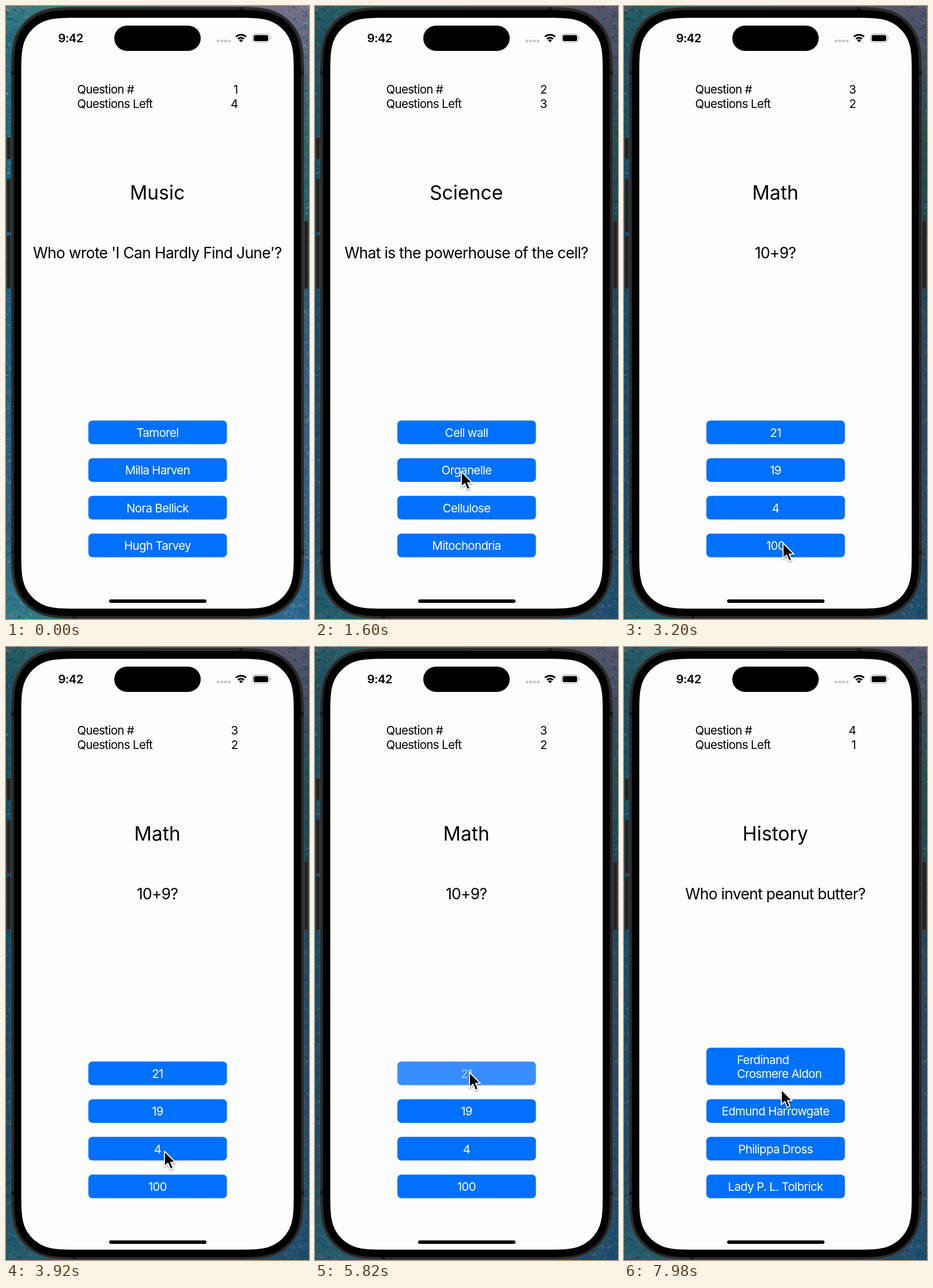
Recreate the animation shown at these times as an HTML page. Size 526 px wide and 1064 px high, loop 8000 ms.

```html
<!DOCTYPE html>
<html lang="en">
<head>
<meta charset="utf-8">
<title>Quiz</title>
<style>
html, body { margin: 0; width: 100%; height: 100%; overflow: hidden; background: #185a78; }
svg { display: block; width: 526px; height: 1064px; }
text { font: 400 20.5px Inter, Roboto, sans-serif; letter-spacing: -.033em; fill: #000; }
.mid { text-anchor: middle; }
.end { text-anchor: end; }
.title { font-size: 33.7px; letter-spacing: 0; }
.ask { font-size: 26.5px; letter-spacing: -.027em; }
.clock { font-weight: 600; }
.answer { fill: #fff; }
</style>
</head>
<body>
<svg viewBox="0 0 526 1064">
  <defs>
    <linearGradient id="left" x2="0" y2="1">
      <stop offset="0" stop-color="#3a7c80"/><stop offset=".05" stop-color="#256a7c"/>
      <stop offset=".3" stop-color="#10658a"/><stop offset=".6" stop-color="#1b6288"/>
      <stop offset=".85" stop-color="#2a6189"/><stop offset="1" stop-color="#2d7c87"/>
    </linearGradient>
    <linearGradient id="right" x2="0" y2="1">
      <stop offset="0" stop-color="#77708a"/><stop offset=".08" stop-color="#5c6680"/>
      <stop offset=".2" stop-color="#2a6668"/><stop offset=".35" stop-color="#235e70"/>
      <stop offset=".6" stop-color="#365f86"/><stop offset="1" stop-color="#28658f"/>
    </linearGradient>
    <filter id="soft" x="-50%" y="-50%" width="200%" height="200%">
      <feDropShadow dx="0" dy="2" stdDeviation="1.5" flood-opacity=".4"/>
    </filter>
  </defs>

  <rect width="263" height="1064" fill="url(#left)"/>
  <rect x="263" width="263" height="1064" fill="url(#right)"/>
  <g id="paint" fill="none" stroke-linecap="round"></g>
  <rect id="shade" width="526" height="1064" fill="#00101a" opacity="0"/>

  <!-- phone body -->
  <g fill="#222" stroke="#454545" stroke-width=".8">
    <rect x="1.5" y="228" width="9" height="38" rx="2"/>
    <rect x="1.5" y="300" width="9" height="93" rx="2"/>
    <rect x="1.5" y="398" width="9" height="93" rx="2"/>
    <rect x="515" y="373" width="9.5" height="118" rx="2"/>
  </g>
  <path id="body" fill="#292929" stroke="#505050"/>
  <path d="M9 116h6M511 116h6M9 948h6M511 948h6M408 2v6M119 1057v6" stroke="#151515" stroke-width="6"/>
  <path id="bezel"/>
  <path id="screen" fill="#fdfdfd"/>

  <!-- status bar -->
  <text class="clock" x="90.5" y="63">9:42</text>
  <rect x="188" y="34" width="150" height="44" rx="22"/>
  <g fill="#c6c6c8">
    <rect x="365.5" y="58.5" width="5" height="4.5" rx="1.5"/>
    <rect x="372" y="58.5" width="5" height="4.5" rx="1.5"/>
    <rect x="378.5" y="58.5" width="5" height="4.5" rx="1.5"/>
    <rect x="385" y="58.5" width="5" height="4.5" rx="1.5"/>
  </g>
  <path d="M399.2 53.5A12.5 12.5 0 0 1 416.8 53.5M402.7 57.2A7.5 7.5 0 0 1 413.3 57.2" fill="none" stroke="#000" stroke-width="3"/>
  <path d="M408 63l-3.4-3.5a4.8 4.8 0 0 1 6.8 0z"/>
  <rect x="428" y="48.5" width="29" height="14.5" rx="4.5" fill="none" stroke="#a4a4a6" stroke-width="1.2"/>
  <rect x="430" y="50.5" width="25" height="10.5" rx="2.8"/>
  <path d="M458.8 53.2q2.6 2.5 0 5z" fill="#a4a4a6"/>

  <text x="123.5" y="152">Question #</text>
  <text x="123.5" y="176.5">Questions Left</text>
  <g id="quiz"></g>
  <rect x="179" y="1030" width="169" height="6" rx="3"/>
  <path id="cursor" d="M0 0V26.5L6.2 21L10.5 31L15 29L10.9 19.4H19Z" stroke="#fff" stroke-width="1.8" stroke-linejoin="round" filter="url(#soft)"/>
</svg>
<script>
const LOOP = 8000;
const $ = id => document.getElementById(id);

const rounds = [
  { at: 0, topic: "Music", ask: "Who wrote 'I Can Hardly Find June'?",
    answers: ["Tamorel", "Milla Harven", "Nora Bellick", "Hugh Tarvey"] },
  { at: 1120, topic: "Science", ask: "What is the powerhouse of the cell?",
    answers: ["Cell wall", "Organelle", "Cellulose", "Mitochondria"] },
  { at: 2720, topic: "Math", ask: "10+9?", answers: ["21", "19", "4", "100"] },
  { at: 5940, topic: "History", ask: "Who invent peanut butter?",
    answers: ["Ferdinand\nCrosmere Aldon", "Edmund Harrowgate", "Philippa Dross", "Lady P. L. Tolbrick"] }
];

// start, end, button index
const presses = [[1000, 1120, 1], [2580, 2720, 3], [5780, 5940, 0]];

// time, x, y of the pointer tip
const path = [
  [350, 262, 1070], [900, 254, 808], [1750, 254, 808], [2400, 276, 932],
  [3200, 276, 932], [3800, 275, 875], [4400, 275, 875], [5000, 270, 790],
  [5200, 270, 790], [5650, 268, 738], [6300, 268, 738], [7300, 273, 768], [LOOP, 273, 768]
];

// rectangle whose corners ease gradually into the straight sides
function smoothRect(x, y, w, h, r) {
  const arc = [[1.529, 0], [1.088, 0], [.868, 0], [.631, .075], [.373, .169],
    [.169, .373], [.075, .631], [0, .868], [0, 1.088], [0, 1.529]];
  const corner = (right, bottom, turn) => {
    const pts = arc.map(([a, b]) => [right ? x + w - a * r : x + a * r, bottom ? y + h - b * r : y + b * r]);
    if (turn) pts.reverse();
    return `${pts[0]} C${pts.slice(1).join(" ")}`;
  };
  return `M${corner(0, 0, true)} L${corner(1, 0)} L${corner(1, 1, true)} L${corner(0, 1)}Z`;
}

function button(label, i, pressed) {
  const lines = label.split("\n"), extra = (lines.length - 1) * 24;
  const y = 719.5 + i * 65.4, base = y + 28.2;
  const text = extra
    ? lines.map((s, k) => `<text class="answer" x="196" y="${base - extra + k * 24}">${s}</text>`).join("")
    : `<text class="answer mid" x="263" y="${base}" fill-opacity="${pressed ? .6 : 1}">${label}</text>`;
  return `<rect x="143" y="${y - extra}" width="240.5" height="${41 + extra}" rx="7" fill="${pressed ? "#388eff" : "#0070ff"}"/>` + text;
}

function showRound(n, pressed) {
  const r = rounds[n];
  $("quiz").innerHTML =
    `<text class="end" x="402.5" y="152">${n + 1}</text>` +
    `<text class="end" x="402.5" y="176.5">${4 - n}</text>` +
    `<text class="mid title" x="262.7" y="336">${r.topic}</text>` +
    `<text class="mid ask" x="262.7" y="437.8">${r.ask}</text>` +
    r.answers.map((a, i) => button(a, i, i === pressed)).join("");
}

function pointer(t) {
  const i = Math.max(1, path.findIndex(p => p[0] > t));
  const [t0, x0, y0] = path[i - 1], [t1, x1, y1] = path[i];
  const u = Math.max(0, (t - t0) / (t1 - t0)), e = u * u * (3 - 2 * u);
  return [x0 + (x1 - x0) * e, y0 + (y1 - y0) * e];
}

// brush dabs along the visible edges of the desktop
function paintEdges() {
  let seed = 7;
  const rnd = () => (seed = seed * 16807 % 2147483647) / 2147483647;
  const hues = ["#3f8fb0", "#0b4566", "#2f8f7a", "#6a6a9c", "#164f50", "#7fa3a0", "#9a6a80"];
  let dabs = "";
  for (let i = 0; i < 800; i++) {
    const corner = i % 3 === 0, side = rnd() < .5;
    const inset = rnd() * (corner ? 45 : 9);
    const x = side ? inset : 526 - inset;
    const y = corner ? (rnd() < .5 ? rnd() * 45 : 1064 - rnd() * 45) : rnd() * 1064;
    dabs += `<path d="M${x} ${y}l${rnd() * 10 - 5} ${rnd() * 6 - 3}" stroke="${hues[i % 7]}" stroke-width="${1 + rnd() * 2}" opacity=".5"/>`;
  }
  $("paint").innerHTML = dabs;
}

let shown = "";
function frame() {
  const t = performance.now() % LOOP;
  const n = rounds.filter(r => r.at <= t).length - 1;
  const press = presses.find(p => t >= p[0] && t < p[1]);
  const pressed = press ? press[2] : -1;
  const key = n + "," + pressed;
  if (key !== shown) showRound(n, pressed);
  shown = key;
  $("shade").setAttribute("opacity", t < 1000 ? 0 : .28);
  $("cursor").setAttribute("transform", `translate(${pointer(t)})`);
  requestAnimationFrame(frame);
}

$("body").setAttribute("d", smoothRect(8.5, 1.5, 509, 1062, 85));
$("bezel").setAttribute("d", smoothRect(14, 7, 498, 1052, 79));
$("screen").setAttribute("d", smoothRect(26.5, 20.5, 473, 1025.5, 67));
paintEdges();
frame();
</script>
</body>
</html>
```
